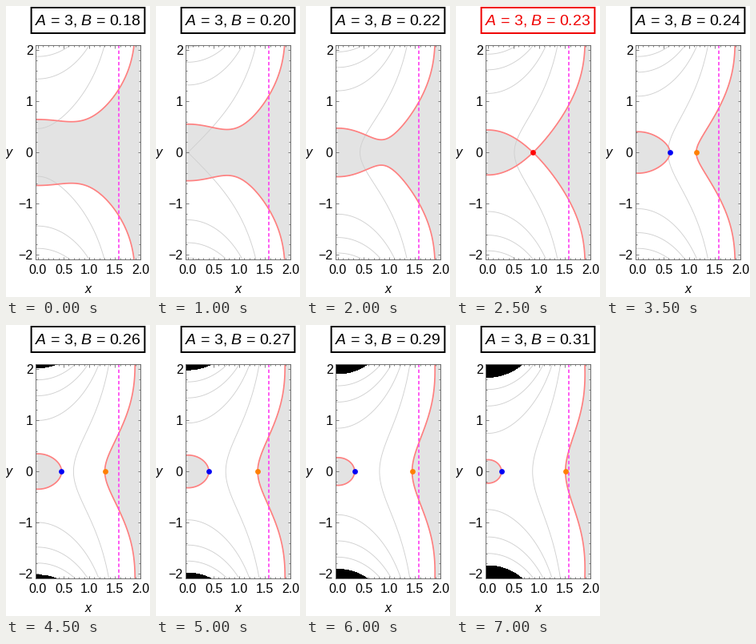
Recreate the animation shown at these times as a matplotlib script. Size 180 by 364 pixels, loop 7500 ms.

```python
import numpy as np
import matplotlib.pyplot as plt
from matplotlib.animation import FuncAnimation
from matplotlib.patches import Rectangle
from matplotlib.ticker import MultipleLocator

W, H, DPI = 180, 364, 100
PT = 72 / DPI  # points per pixel
A = 3
X_RANGE, Y_RANGE = (-0.042, 2.002), (-2.092, 2.092)

plt.rcParams.update({
    "font.family": "Liberation Sans",
    "mathtext.fontset": "custom",
    "mathtext.rm": "Liberation Sans",
    "mathtext.it": "Liberation Sans:italic",
})


def margin(x, y, b):
    """Positive inside the shaded region."""
    return (1 - b * np.cos(x) * np.cosh(y)) ** 4 - A * b * np.hypot(np.sin(x), np.sinh(y))


axis_x = np.linspace(0, 1.9, 4001)


def critical_b(lo=0.2, hi=0.25):
    """Value of B at which the shaded region pinches off."""
    for _ in range(40):
        mid = (lo + hi) / 2
        if margin(axis_x, 0, mid).min() > 0:
            lo = mid
        else:
            hi = mid
    return lo


B_CRIT = critical_b()
values = [0.18 + 0.01 * k for k in range(5)] + [B_CRIT] + [0.23 + 0.01 * k for k in range(9)]

fig = plt.figure(figsize=(W / DPI, H / DPI), dpi=DPI, facecolor="white")


def px_text(x, y, s, size, **kw):
    return fig.text(x / W, 1 - y / H, s, fontsize=size * PT, ha="center", va="baseline", **kw)


left, right, top, bottom = 37.3, 168.3, 49.2, 317.2
ax = fig.add_axes([left / W, 1 - bottom / H, (right - left) / W, (bottom - top) / H])
ax.set_xlim(X_RANGE)
ax.set_ylim(Y_RANGE)
ax.xaxis.set_major_locator(MultipleLocator(0.5))
ax.xaxis.set_minor_locator(MultipleLocator(0.1))
ax.yaxis.set_major_locator(MultipleLocator(1))
ax.yaxis.set_minor_locator(MultipleLocator(0.2))
ax.xaxis.set_major_formatter("{x:.1f}")
ax.yaxis.set_major_formatter(lambda v, _: f"{v:.0f}".replace("-", "\u2212"))
EDGE = "#666666"
for which, length in (("major", 3.5), ("minor", 2)):
    ax.tick_params(which=which, direction="in", top=True, right=True,
                   length=length * PT, width=0.8 * PT, color=EDGE)
ax.tick_params(labelsize=16 * PT)
ax.tick_params(axis="x", pad=5.6 * PT)
ax.tick_params(axis="y", pad=3.6 * PT)
for spine in ax.spines.values():
    spine.set(linewidth=0.9 * PT, color=EDGE, zorder=6)
ax.set_axisbelow(False)

ax.axvline(np.pi / 2, color="#ff40f0", lw=1.7 * PT, dashes=(2.5, 1.7), zorder=4)
px_text(102.3, 359, "x", 16, style="italic")
px_text(4.2, 188.3, "y", 16, style="italic")

title = px_text(102.5, 24, "", 19.5)
box = fig.add_artist(Rectangle((31.6 / W, 1 - 34 / H), 141.8 / W, 32 / H, fill=False,
                               lw=2 * PT, joinstyle="miter", snap=False))

X, Y = np.meshgrid(np.linspace(*X_RANGE, 256), np.linspace(*Y_RANGE, 521))
drawn = []


def dot(x, color):
    drawn.extend(ax.plot(x, 0, "o", color=color, ms=6.8 * PT, mew=0, zorder=5, snap=False))


def draw(i):
    b = values[i]
    while drawn:
        drawn.pop().remove()

    m = margin(X, Y, b)
    w = b * np.cos(X) * np.cosh(Y)
    drawn.extend([
        ax.contourf(X, Y, m, levels=[0, 1e6], colors=["#e3e3e3"], zorder=1),
        ax.contour(X, Y, w, levels=[0.2, 0.4, 0.6, 0.8], colors="#d0d0d0",
                   linewidths=0.9 * PT, zorder=2),
        ax.contour(X, Y, m, levels=[0], colors="#ff8080", linewidths=1.7 * PT, zorder=3),
        ax.contourf(X, Y, w, levels=[1, 1e6], colors=["black"], zorder=3.5),
    ])

    pinch = b == B_CRIT
    on_axis = margin(axis_x, 0, b)
    if pinch:
        dot(axis_x[on_axis.argmin()], "#ff0000")
    elif b > B_CRIT:
        inside = axis_x[on_axis < 0]
        dot(inside[0], "#0000f5")
        dot(inside[-1], "#ff8000")

    color = "#f00000" if pinch else "black"
    title.set_text(f"$A$ = {A}, $B$ = {b:.2f}")
    title.set_color(color)
    box.set_edgecolor(color)


anim = FuncAnimation(fig, draw, frames=len(values), interval=500,
                     repeat=True, repeat_delay=0, blit=False)
plt.show()
```
